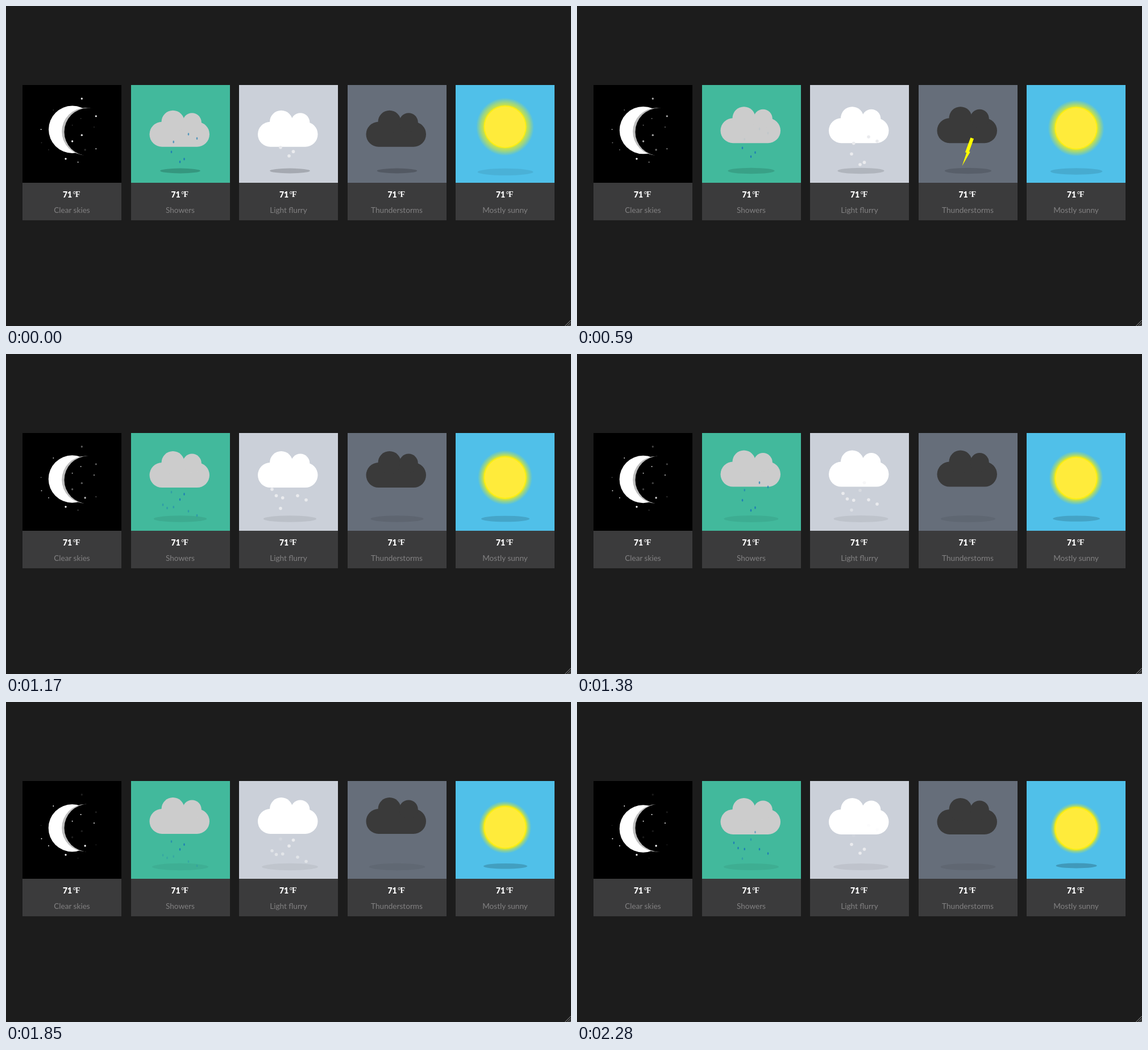
These frames come from a looping animation (994x563 px, 2.38 s). An HTML page with a canvas:

```html
<!DOCTYPE html>
<html lang="en">
<head>
<meta charset="utf-8">
<title>Weather cards</title>
<style>
  html, body { margin: 0; width: 100%; height: 100%; overflow: hidden; background: #1c1c1c; }
  canvas { position: absolute; left: 0; top: 0; }
  .card { position: absolute; top: 139px; width: 174px; height: 238px; background: #3b3b3c; }
  .sky { height: 172px; }
  .card b, .card p { position: absolute; margin: 0; line-height: 20px; white-space: nowrap; }
  .card b { left: 71px; top: 183px; color: #fff; font: 900 14px/20px Lato, sans-serif; }
  .card i { position: absolute; left: 17.5px; top: 0; font: bold 14px/20px "Liberation Serif", serif; letter-spacing: -1px; }
  .card p { left: 0; width: 100%; top: 210px; text-align: center; color: #828182; font: 13.6px/20px Lato, sans-serif; }
</style>
</head>
<body>
<canvas width="994" height="563"></canvas>
<script>
const LOOP = 2380, LAST = 2280, TOP = 139;
const lefts = [0, 1, 2, 3, 4].map(i => 29 + 190.5 * i);
const canvas = document.querySelector('canvas');
const ctx = canvas.getContext('2d');

[['Clear skies', '#000'], ['Showers', '#42b99c'], ['Light flurry', '#cbd0d9'],
 ['Thunderstorms', '#666e7a'], ['Mostly sunny', '#50c0e9']].forEach(([label, sky], i) => {
  canvas.insertAdjacentHTML('beforebegin',
    `<div class="card" style="left:${lefts[i]}px"><div class="sky" style="background:${sky}"></div>
     <b>71<i>°F</i></b><p>${label}</p></div>`);
});

// Offsets from the lowest star; a third value of 1 marks a small star.
const fadingStars = [[26, 7, 1], [-52, -62, 1], [14, -37], [34, -50], [64, -21, 1], [64, -90], [34, -127]];
const risingStars = [[-36, -19, 1], [-51, -34, 1], [41, -19], [14, -71, 1], [32, -85, 1], [60, -67, 1], [-26, -103, 1]];

// x, phase at which the fall starts, heights at each quarter of the fall
const falls = [
  [30, .75, [20, 30, 45, 70, 95]],
  [40, .75, [35, 40, 60, 80, 100]],
  [50, .5, [45, 60, 75, 90, 100]],
  [55, .75, [40, 50, 65, 80, 95]],
  [70, .25, [40, 60, 80, 100, 120]],
  [80, .25, [20, 45, 70, 95, 120]],
  [110, .75, [25, 45, 70, 95, 120]],
  [90, .75, [15, 35, 60, 85, 110]]
];

const mix = (a, b, k) => a + (b - a) * k;

// CSS ease-in-out, running forward and then back
function swing(x) {
  x = x % 2;
  if (x > 1) x = 2 - x;
  let lo = 0, hi = 1;
  for (let i = 0; i < 20; i++) {
    const s = (lo + hi) / 2, r = 1 - s;
    if (1.26 * s * r * r + 1.74 * s * s * r + s * s * s < x) lo = s; else hi = s;
  }
  return lo * lo * (3 - 2 * lo);
}

function ellipse(x, y, rx, ry, color, alpha = 1) {
  ctx.globalAlpha = alpha;
  ctx.fillStyle = color;
  ctx.beginPath();
  ctx.ellipse(x, y, rx, ry, 0, 0, 7);
  ctx.fill();
  ctx.globalAlpha = 1;
}
const disc = (x, y, r, color, alpha) => ellipse(x, y, r, r, color, alpha);

function night(time) {
  const angle = (8.8 - 5.7 * time) * Math.PI / 180, x = 115.4, y = 82.5, r = 41.7;
  for (const [shift, color] of [[28, '#fff'], [4.5, '#bdbdbd'], [0, '#000']])
    disc(x - shift * Math.cos(angle), y - shift * Math.sin(angle), r + (shift ? 0 : .2), color);

  const fade = swing(.22 + time / 2.5);
  const star = alpha => ([dx, dy, small]) =>
    disc(76 + dx * 5 / 6, 129.8 + dy * 5 / 6, small ? .95 : 1.67, '#fff', alpha);
  fadingStars.forEach(star(mix(1, .1, fade)));
  risingStars.forEach(star(mix(.1, 1, fade)));
  star(1)([0, 0]);
}

function cloud(time, color, shadowX) {
  const lift = swing(.32 + time / 2.5), bottom = 113 - 20 * lift, scale = mix(.7, 1.1, lift);
  ellipse(shadowX, 151, 45 * scale, 5.6 * scale, '#000', mix(.22, .05, lift));
  ctx.fillStyle = color;
  ctx.beginPath();
  ctx.roundRect(33, bottom - 44, 105.5, 44, 22);
  ctx.fill();
  disc(74.2, bottom - 43.8, 20.2, color);
  disc(107.8, bottom - 43, 16.5, color);
}

function fall(phase, x, rx, ry, color) {
  for (const [dx, start, heights] of falls) {
    const pos = (phase - start + 1) % 1 * 4, i = Math.floor(pos), k = pos - i;
    const alphas = [0, dx < 50 ? 0 : 1, 1, 1, 0];
    ellipse(x + dx * .75, 65 + mix(heights[i], heights[i + 1], k) * .75, rx, ry, color,
      mix(alphas[i], alphas[i + 1], k));
  }
}

function bolt(age) {
  if (age < 0 || age >= .3) return;
  ctx.save();
  ctx.translate(79.5, 129.5);
  ctx.rotate([20, -34, 0][Math.floor(age * 10)] * Math.PI / 180);
  ctx.fillStyle = '#ff0';
  ctx.fillRect(-1, -39, 6, 27.5);
  ctx.beginPath();
  ctx.moveTo(1.4, -15);
  ctx.lineTo(7, -15);
  ctx.lineTo(2, 13);
  ctx.fill();
  ctx.restore();
}

function sun(time) {
  const k = time / 2.08, x = 87, y = 73.5 + 4.8 * time, r = 37.5;
  const width = 98 - 12.5 * time;
  ellipse(87.6, 153 - 1.95 * time, width / 2, width / 16, '#000', .075 + .06 * time);

  const outer = mix(51, 45, k), glow = ctx.createRadialGradient(x, y, r - 1, x, y, outer);
  glow.addColorStop(0, `rgba(255,240,0,${mix(.75, .95, k)})`);
  glow.addColorStop(.5, `rgba(255,240,0,${mix(.4, .33, k)})`);
  glow.addColorStop(1, 'rgba(255,240,0,0)');
  disc(x, y, outer, glow);
  disc(x, y, r, '#ffee12');
  disc(x, y, r - 1.8, '#ffeb3b');
}

function grip() {
  ctx.strokeStyle = '#a0a0a0';
  ctx.lineWidth = 1;
  ctx.beginPath();
  for (const size of [10, 6, 2]) {
    ctx.moveTo(993.5 - size, 563);
    ctx.lineTo(994, 562.5 - size);
  }
  ctx.stroke();
}

function draw(now) {
  const t = Math.min(now % LOOP, LAST) / 1000;
  const time = .855 * (t + .0127 * t ** 3);   // playback speeds up slightly
  const scenes = [
    () => night(time),
    () => { cloud(time, '#ccc', 87); fall((.92 + time / .6) % 1, 34, 1.3, 2.3, '#2080b4'); },
    () => { cloud(time, '#fff', 89.5); fall((.745 + time / 2) % 1, 35.5, 2.8, 2.8, '#eaebee'); },
    () => { cloud(time, '#3a3a3a', 87.5); bolt(time - .46); },
    () => sun(time)
  ];
  ctx.clearRect(0, 0, 994, 563);
  scenes.forEach((scene, i) => {
    ctx.save();
    ctx.translate(lefts[i], TOP);
    scene();
    ctx.restore();
  });
  grip();
}

function tick() {
  draw(performance.now());
  requestAnimationFrame(tick);
}
tick();
</script>
</body>
</html>
```
